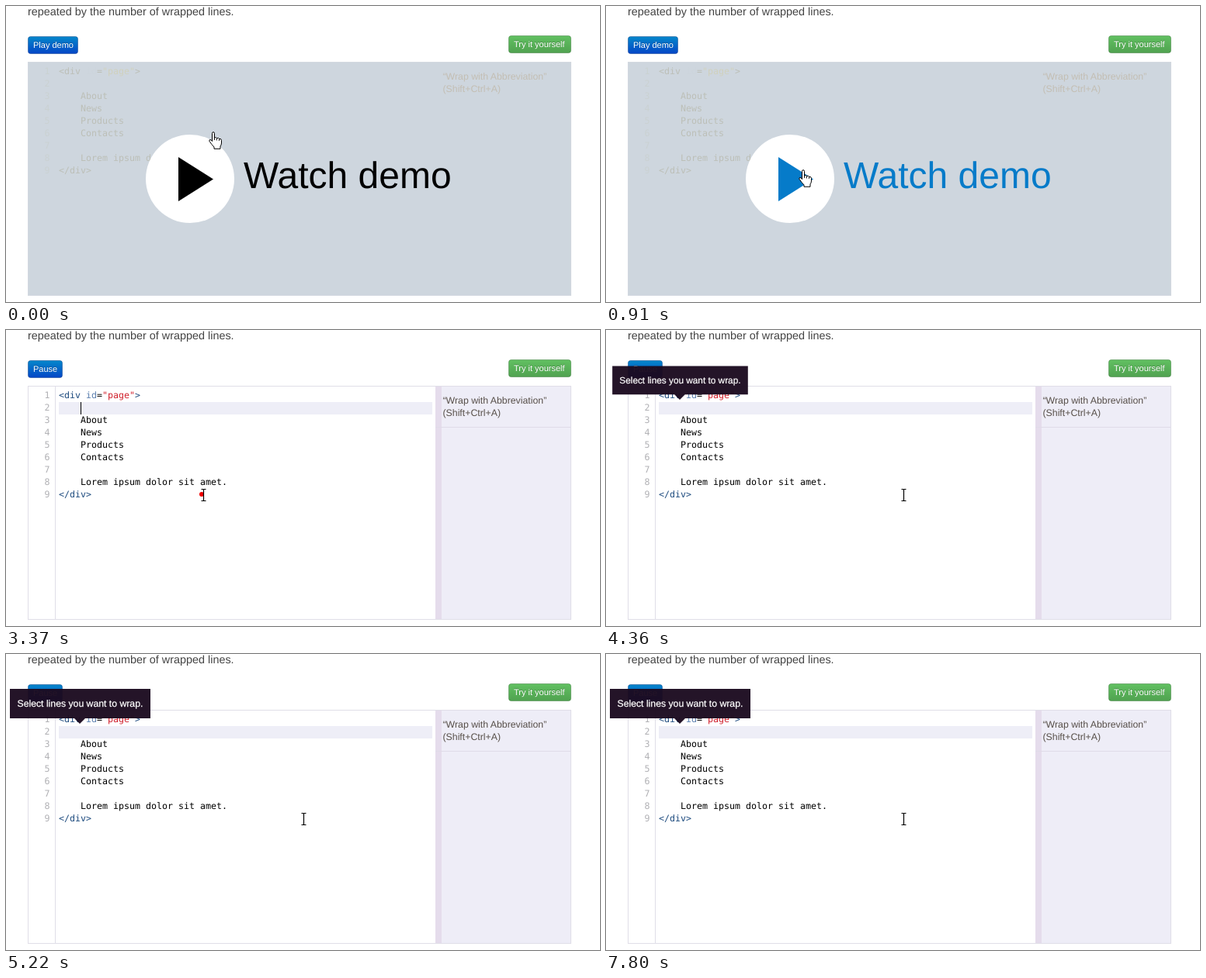
An HTML page for the animation above (8000 ms loop, 765 by 382 pixels).

```html
<!DOCTYPE html>
<html lang="en">
<head>
<meta charset="utf-8">
<title>Wrap demo</title>
<style>
html, body { margin: 0; width: 100%; height: 100%; overflow: hidden; background: #fff; }
svg { display: block; width: 765px; height: 382px; font-family: "Liberation Sans", Arial, sans-serif; }
text { white-space: pre; text-rendering: geometricPrecision; }
.code text { font: 11.63px "DejaVu Sans Mono", monospace; }
.live { fill: #000; }
.live .num { fill: #b0b0b4; }
.live .tag { fill: #1c4a7e; }
.live .attr { fill: #5a7eae; }
.live .str { fill: #d0202c; }
.faded { fill: #bcbfb7; }
.faded .num { fill: #cad1d2; }
.faded .attr { fill: #cdd5dc; }
.faded .str { fill: #d0d1bd; }
.note { font-size: 12.3px; }
.live .note { fill: #574f49; }
.faded .note { fill: #c3beb3; }
.label { font-size: 11px; fill: #fff; text-shadow: 0 -1px 0 rgba(0,0,0,.25); }
.num { text-anchor: end; }
</style>
</head>
<body>
<svg viewBox="0 0 765 382">
  <defs>
    <linearGradient id="blue" x2="0" y2="1">
      <stop stop-color="#0587cb"/><stop offset="1" stop-color="#0446c6"/>
    </linearGradient>
    <linearGradient id="green" x2="0" y2="1">
      <stop stop-color="#61c061"/><stop offset="1" stop-color="#50a250"/>
    </linearGradient>
  </defs>

  <text x="28" y="12" font-size="14.4" fill="#444">repeated by the number of wrapped lines.</text>

  <rect id="button" x="28.5" y="39.5" width="64" height="22" rx="3" fill="url(#blue)" stroke="#06357f" stroke-opacity=".45"/>
  <text id="buttonText" class="label" x="35" y="54">Play demo</text>
  <rect x="647.5" y="38.5" width="80" height="22" rx="3" fill="url(#green)" stroke="#2e6e2e" stroke-opacity=".45"/>
  <text class="label" x="654" y="53">Try it yourself</text>

  <g id="editor">
    <rect x="28.5" y="72.5" width="699" height="301" fill="#fff" stroke="#e0dee8"/>
    <path d="M63.5 73V373" stroke="#e0dee8"/>
    <rect x="68" y="93" width="481" height="16" fill="#eeeef7"/>
    <rect x="561" y="73" width="166" height="300" fill="#eeedf7"/>
    <rect x="553" y="73" width="8" height="300" fill="#e5dcec"/>
    <path d="M553 125.5H727" stroke="#dfdbe8"/>
    <g class="code live" id="liveCode"></g>
    <rect id="caret" x="96" y="93" width="1" height="16"/>
  </g>

  <g id="cover">
    <rect x="28.5" y="72.5" width="699" height="301" fill="#ced6de" stroke="#d3d8e0"/>
    <g class="code faded" id="fadedCode"></g>
    <circle cx="237" cy="223" r="57" fill="#fff"/>
    <g id="play">
      <path d="M222 195L267 223.500L222 252Z"/>
      <text x="306" y="235" font-size="48">Watch demo</text>
    </g>
  </g>

  <g id="tip">
    <path d="M5 45H186V83H102L95 90L88 83H5Z" fill="#1c0b20" fill-opacity=".96"/>
    <text x="14.500" y="68" font-size="12.24" fill="#fff" stroke="#fff" stroke-width=".25">Select lines you want to wrap.</text>
  </g>

  <circle id="dot" cx="252" cy="212" r="3" fill="#f00000"/>
  <g id="hand" fill="#fff" stroke="#000" stroke-linejoin="round">
    <path d="M4.500 2.500Q4.500.7 6 .7T7.500 2.500V8Q10 7 10.500 8.500Q13 7.800 13.500 9.300Q16.500 9 16.500 11.500V15Q16.300 17.500 15 19V22.300H7V20Q4 17 1 12.500Q.5 10.500 2 10.500T4.500 12.500Z"/>
    <path d="M4.500 12.500V8M7.500 8V11M10.500 8.500V11.500M13.500 9.300V12" fill="none" stroke-width=".9"/>
  </g>
  <g id="beam" fill="none">
    <path id="beamShape" d="M-3.500 -7.500H-1.500Q-.5 -7.500 -.5 -6.500Q-.5 -7.500 .5 -7.500H2.500M-.5 -6.500V6.500M-3.500 7.500H-1.500Q-.5 7.500 -.5 6.500Q-.5 7.500 .5 7.500H2.500" stroke="#000" stroke-width="1.200"/>
  </g>
</svg>
<script>
const LOOP = 8000;
const START = 3370;
const $ = id => document.getElementById(id);
const show = (id, on) => $(id).setAttribute("display", on ? "inline" : "none");
const clamp = v => Math.min(1, Math.max(0, v));
const part = (t, from, to) => clamp((t - from) / (to - from));
const ease = p => (1 - Math.cos(Math.PI * p)) / 2;
const mix = (a, b, p) => a + (b - a) * p;
const place = (id, x, y) => $(id).setAttribute("transform", `translate(${x} ${y})`);

const span = (cls, s) => `<tspan class="${cls}">${s}</tspan>`;
const lines = [
  [68, span("tag", "&lt;div ") + span("attr", "id") + "=" + span("str", '"page"') + span("tag", "&gt;")],
  [96, ""],
  [96, "About"],
  [96, "News"],
  [96, "Products"],
  [96, "Contacts"],
  [96, ""],
  [96, "Lorem ipsum dolor sit amet."],
  [68, span("tag", "&lt;/div&gt;")]
];

function fillCode(id) {
  const rows = lines.map(([x, s], i) => {
    const y = 88 + 16 * i;
    return `<text class="num" x="56.5" y="${y}">${i + 1}</text><text x="${x}" y="${y}">${s}</text>`;
  });
  const notes = ["“Wrap with Abbreviation”", "(Shift+Ctrl+A)"].map((s, i) =>
    `<text class="note" x="562.5" y="${95 + 16 * i}" style="font-family:'Liberation Sans',sans-serif;font-size:12.3px">${s}</text>`);
  $(id).innerHTML = rows.concat(notes).join("");
}

// Elastic growth: overshoots, dips, then settles at 1.
const elastic = p => 1 - 2 ** (-10 * p) * Math.cos(2 * Math.PI * p / 0.3);

const caretOn = [[3370, 3930], [4570, 5220], [5820, 6480], [7140, 7800]];

function draw(t) {
  const running = t >= START;
  show("cover", !running);
  show("editor", running);
  show("hand", !running);
  show("beam", running);

  $("button").setAttribute("width", running ? 44 : 64);
  $("buttonText").textContent = running ? "Pause" : "Play demo";

  const move = ease(part(t, 0, 930));
  place("hand", mix(261, 248, move), mix(162, 211, move));
  const hover = part(t, 340, 640);
  $("play").setAttribute("fill", `rgb(${6 * hover},${123 * hover},${201 * hover})`);

  show("dot", t >= 3240 && t < 3730);
  $("dot").setAttribute("r", running ? 3 : 2.3);
  $("dot").setAttribute("opacity", 1 - part(t, 3390, 3730));

  place("beam", Math.round(mix(255, 384, ease(part(t, 3900, 4300)))), 213);
  show("caret", caretOn.some(([a, b]) => t >= a && t < b));

  const grow = part(t, 3930, 5145);
  show("tip", grow > 0);
  const size = grow < 0.87 ? elastic(grow) : 1;
  $("tip").setAttribute("transform", `translate(95 90) scale(${size}) translate(-95 -90)`);
}

fillCode("liveCode");
fillCode("fadedCode");
const begin = performance.now();
function tick() {
  draw((performance.now() - begin) % LOOP);
  requestAnimationFrame(tick);
}
tick();
</script>
</body>
</html>
```
